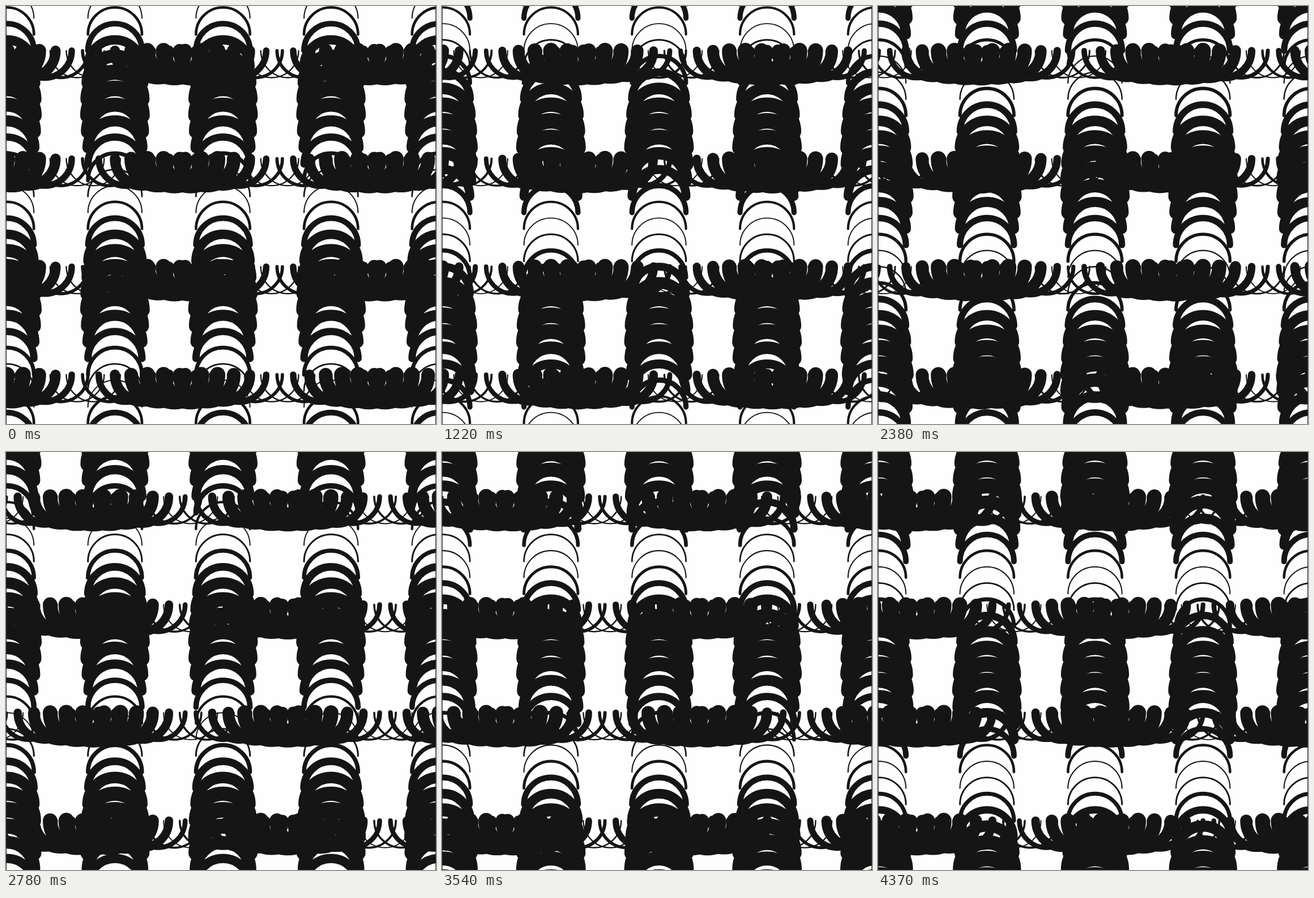
An HTML page with a canvas for the animation above (4470 ms loop, 759 by 738 pixels).

```html
<!DOCTYPE html>
<html lang="en">
<head>
<meta charset="utf-8">
<title>Woven arcs</title>
<style>
  html, body { margin: 0; width: 100%; height: 100%; overflow: hidden; background: #fefefe; }
  canvas { display: block; }
</style>
</head>
<body>
<canvas id="stage" width="759" height="738"></canvas>
<script>
const W = 759, H = 738;
const LOOP = 4470, TICK = 47.4, LAST = 92, TURN = 2.78;
const UNIT = 0.9535;            // pixels per degree of phase
const STEP = 30 * UNIT;         // gap between neighbouring arcs
const PITCH = 200 * UNIT;       // gap between parallel strands
const RADIUS = 50 * UNIT;
const COL_X = 1.6, ROW_Y = 78.8;  // first strand of each direction
const ARC_X = COL_X + 10 * UNIT, ARC_Y = ROW_Y - 2 * STEP;
const THIN_X = 483, THIN_Y = 357; // thinnest spots at the start
const INK = '#151515';

const ctx = document.getElementById('stage').getContext('2d');

const weight = (pos, thin) =>
  14.75 - 12.85 * Math.cos((pos - thin) / UNIT * Math.PI / 180);

function halfRing(x, y, width, from) {
  ctx.lineWidth = width;
  ctx.beginPath();
  ctx.arc(x, y, RADIUS, from, from + Math.PI);
  ctx.stroke();
}

function draw(degrees) {
  const shift = degrees * UNIT;
  ctx.fillStyle = '#fefefe';
  ctx.fillRect(0, 0, W, H);
  ctx.strokeStyle = INK;
  ctx.lineCap = 'round';

  // columns: upper halves, thickness wave travels down
  for (let y = ARC_Y - 2 * STEP; y < H + 80; y += STEP) {
    const width = weight(y, THIN_Y + shift);
    for (let i = 0; i < 5; i++) halfRing(COL_X + i * PITCH, y, width, Math.PI);
  }
  // rows: lower halves, thickness wave travels left
  for (let x = ARC_X - 3 * STEP; x < W + 80; x += STEP) {
    const width = weight(x, THIN_X - shift);
    for (let i = 0; i < 4; i++) halfRing(x, ROW_Y + i * PITCH, width, 0);
  }

  ctx.fillStyle = '#2b2b2b';
  ctx.fillRect(0, 0, 1, H);
  ctx.fillRect(W - 1, 0, 1, H);
}

const start = performance.now();
function loop() {
  const t = (performance.now() - start) % LOOP;
  draw(Math.min(LAST, Math.floor((t + 40) / TICK)) * TURN);
  requestAnimationFrame(loop);
}
loop();
</script>
</body>
</html>
```
